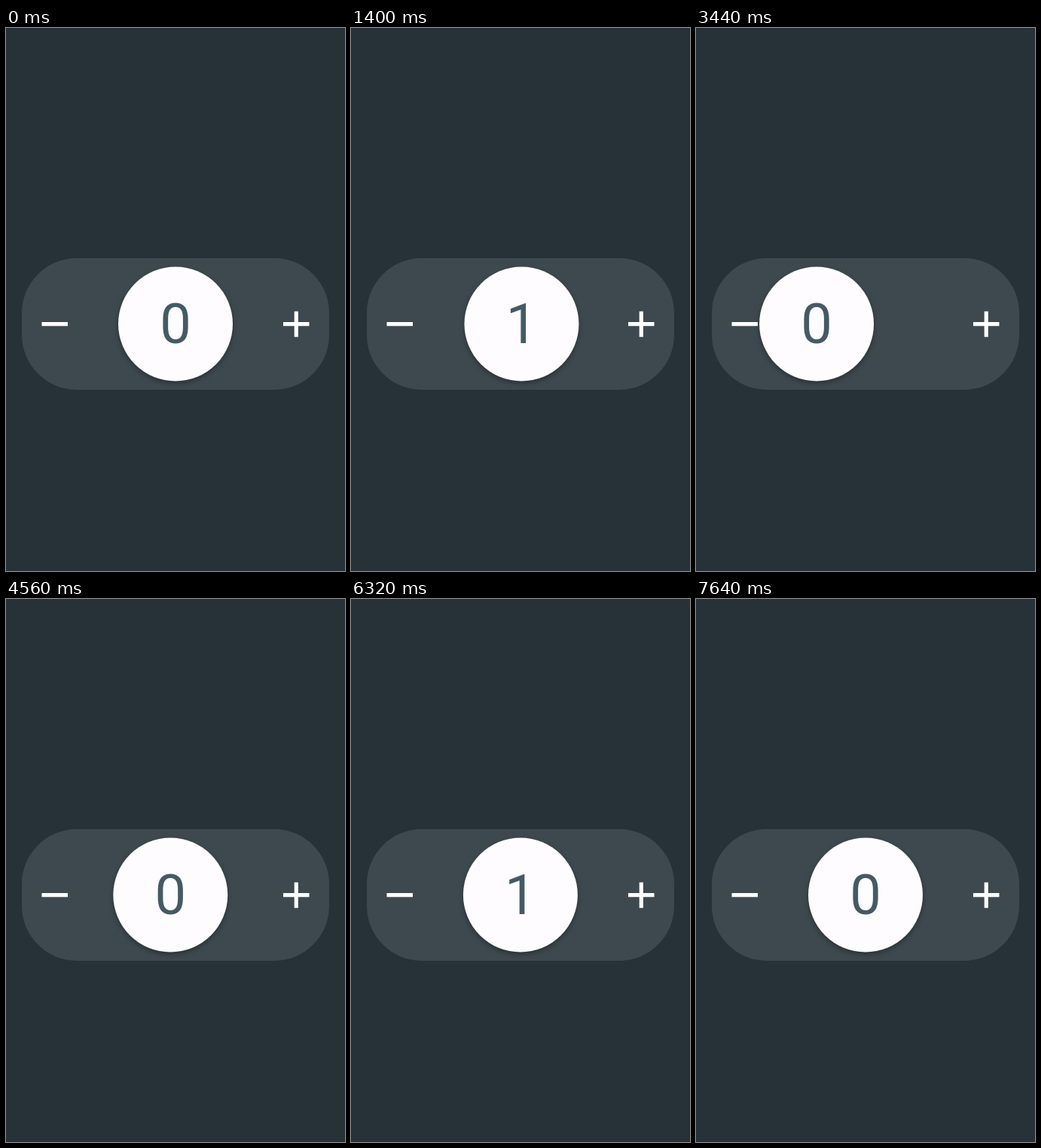
Write an HTML page that moves like this. It is 450 by 722 pixels and loops after 8880 ms.

```html
<!DOCTYPE html>
<html lang="en">
<head>
<meta charset="utf-8">
<title>Stepper</title>
<style>
  html, body { margin: 0; width: 100%; height: 100%; overflow: hidden; background: #263238; }
  svg { display: block; width: 450px; height: 722px; }
  text { font: 400 74px Roboto, sans-serif; text-anchor: middle; fill: #455a64; }
  .knob { fill: #fefcff; filter: drop-shadow(0 3px 3px rgba(0, 0, 0, .32)); }
</style>
</head>
<body>
<svg viewBox="0 0 450 722">
  <clipPath id="pill"><rect x="21" y="306" width="408" height="175" rx="73"/></clipPath>
  <g clip-path="url(#pill)">
    <rect x="21" y="306" width="408" height="175" fill="#3d494f"/>
    <path d="M47.5 393.7h34.5M368 393.7h34.5M385.3 376.7v34" stroke="#fff" stroke-width="5.2"/>
    <g id="ball">
      <circle class="knob" cx="225" cy="393.5" r="76"/>
      <text id="count" x="225" y="419">0</text>
    </g>
  </g>
</svg>
<script>
const LOOP = 8880, STEP = 40;
const ball = document.getElementById('ball');
const count = document.getElementById('count');

const smooth = u => u * u * (3 - 2 * u);
const spring = ms => (1 + 0.018 * ms) * Math.exp(-0.018 * ms);
const glide = ms => Math.max(0, 1 - ms / 480) ** 2;

// Each swipe drags the knob, lets go, then settles back to the centre.
const swipes = [
  { start: 310, hold: 930, release: 960, end: 1440, from: 0, to: 207, value: 1, settle: glide },
  { start: 2480, hold: 3280, release: 3308, end: 3800, from: 31, to: -207, value: 0, settle: spring },
  { start: 4520, hold: 5190, release: 5218, end: 5720, from: -8, to: 117, value: 1, settle: spring, stall: 5360 },
  { start: 6310, hold: 7080, release: 7111, end: 7640, from: 0, to: -207, value: 0, settle: spring }
];

function offsetAt(t) {
  const s = swipes.find(s => t >= s.start && t < s.end);
  if (!s) return 0;
  if (t < s.release) {
    const u = Math.min(1, (t - s.start) / (s.hold - s.start));
    return s.from + (s.to - s.from) * smooth(u);
  }
  const stalled = s.stall && t > s.stall ? STEP : 0;
  return s.to * s.settle(t - s.release - stalled);
}

function valueAt(t) {
  return swipes.reduce((value, s) => t >= s.release ? s.value : value, 0);
}

function draw(now) {
  const t = Math.floor((now % LOOP) / STEP) * STEP;
  ball.setAttribute('transform', `translate(${offsetAt(t).toFixed(2)} 0)`);
  count.textContent = valueAt(t);
}

let origin;
function tick(now) {
  origin ??= now;
  draw(now - origin);
  requestAnimationFrame(tick);
}
draw(0);
requestAnimationFrame(tick);
</script>
</body>
</html>
```
